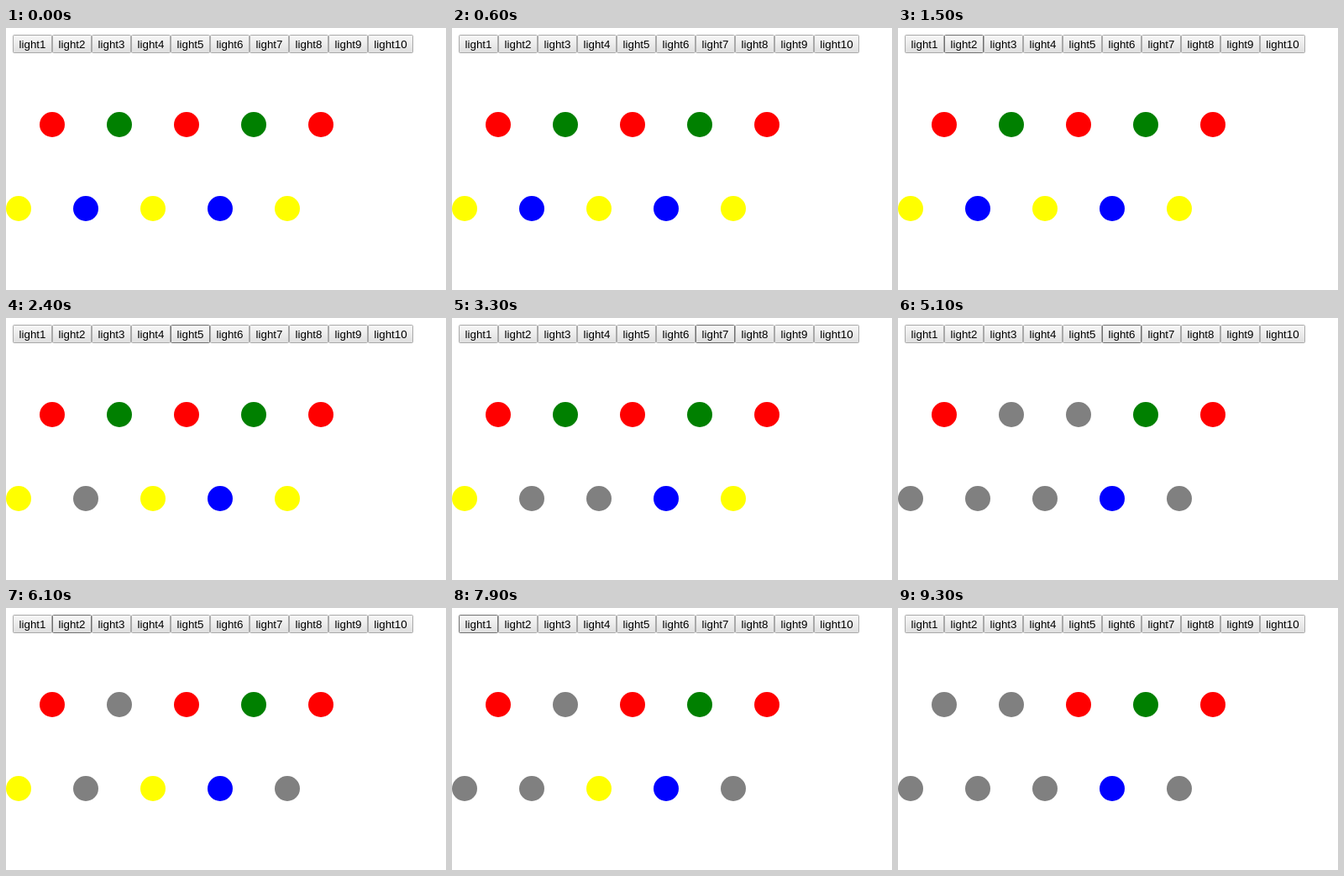
Write an HTML page that moves like this. It is 524x312 px and loops after 9.7 s.

```html
<!DOCTYPE html>
<html lang="en">
<head>
<meta charset="utf-8">
<title>Blinking lights</title>
<style>
  html, body { margin: 0; width: 100%; height: 100%; overflow: hidden; background: #fff; }
  svg { display: block; }
  text { font: 13.333px "Liberation Sans", Arial, sans-serif; text-anchor: middle; }
</style>
</head>
<body>
<svg id="stage" width="524" height="312" viewBox="0 0 524 312">
  <defs>
    <linearGradient id="face" x1="0" y1="0" x2="0" y2="1">
      <stop offset="0" stop-color="#f6f6f6"/>
      <stop offset="0.35" stop-color="#f0f0f0"/>
      <stop offset="1" stop-color="#dedede"/>
    </linearGradient>
  </defs>
</svg>
<script>
const LOOP = 9700, STEP = 100, BLINK = 458, FIRST = 71, COUNT = 10;
const LOWER = ['#ffff00', '#0000ff'], UPPER = ['#ff0000', '#008000'];
const OFF = '#808080', EDGE = '#a9a9a9', EDGE_HOVER = '#707070';

// Spans during which a light keeps the state it had at the start.
const holds = {
  1: [[6800, LOOP]],
  2: [[1700, 5900], [8500, LOOP]],
  3: [[2100, LOOP]],
  4: [[5700, LOOP]],
  5: [[2900, 5600]],
  6: [[5300, LOOP]],
  7: [[4500, LOOP]],
  8: [[4200, LOOP]],
  9: [[3800, LOOP]],
  10: [[3500, LOOP]]
};

// [time, button under the pointer], 0 for none
const hovers = [
  [0, 0], [1300, 2], [1800, 3], [2200, 4], [2400, 5], [2900, 6], [3200, 7],
  [3400, 10], [3700, 9], [4100, 8], [4400, 7], [4700, 6], [5400, 5],
  [5600, 4], [5800, 3], [5900, 2], [6700, 1], [8200, 2], [9100, 4],
  [9200, 6], [9300, 0]
];

const stage = document.getElementById('stage');

function add(tag, attrs) {
  const el = document.createElementNS(stage.namespaceURI, tag);
  for (const key in attrs) el.setAttribute(key, attrs[key]);
  return stage.appendChild(el);
}

function makeButton(n) {
  const x = 8 + 47 * (n - 1), w = n === COUNT ? 54 : 47;
  const box = add('rect', {
    x: x + 0.5, y: 8.5, width: w - 1, height: 21, rx: 1, fill: 'url(#face)'
  });
  add('text', { x: x + w / 2, y: 24 }).textContent = 'light' + n;
  return box;
}

function makeLight(n) {
  const upper = n % 2 === 0;
  const color = (upper ? UPPER : LOWER)[(Math.ceil(n / 2) - 1) % 2];
  const el = add('circle', { cx: 15 + 40 * (n - 1), cy: upper ? 115 : 215, r: 15 });
  return { n, color, el };
}

const numbers = Array.from({ length: COUNT }, (_, i) => i + 1);
const buttons = numbers.map(makeButton);
const lights = numbers.map(makeLight);

const isLit = t => (Math.floor((t - FIRST) / BLINK) + 1) % 2 === 0;

function lightOn(n, t) {
  const hold = holds[n].find(([from, to]) => t >= from && t < to);
  return isLit(hold ? hold[0] : t);
}

function render(ms) {
  const t = Math.floor((ms % LOOP) / STEP) * STEP;
  const hover = hovers.filter(([at]) => at <= t).pop()[1];
  buttons.forEach((box, i) => {
    box.setAttribute('stroke', i + 1 === hover ? EDGE_HOVER : EDGE);
  });
  for (const { n, color, el } of lights) {
    el.setAttribute('fill', lightOn(n, t) ? color : OFF);
  }
}

const start = performance.now();
function tick() {
  render(performance.now() - start);
  requestAnimationFrame(tick);
}
tick();
</script>
</body>
</html>
```
